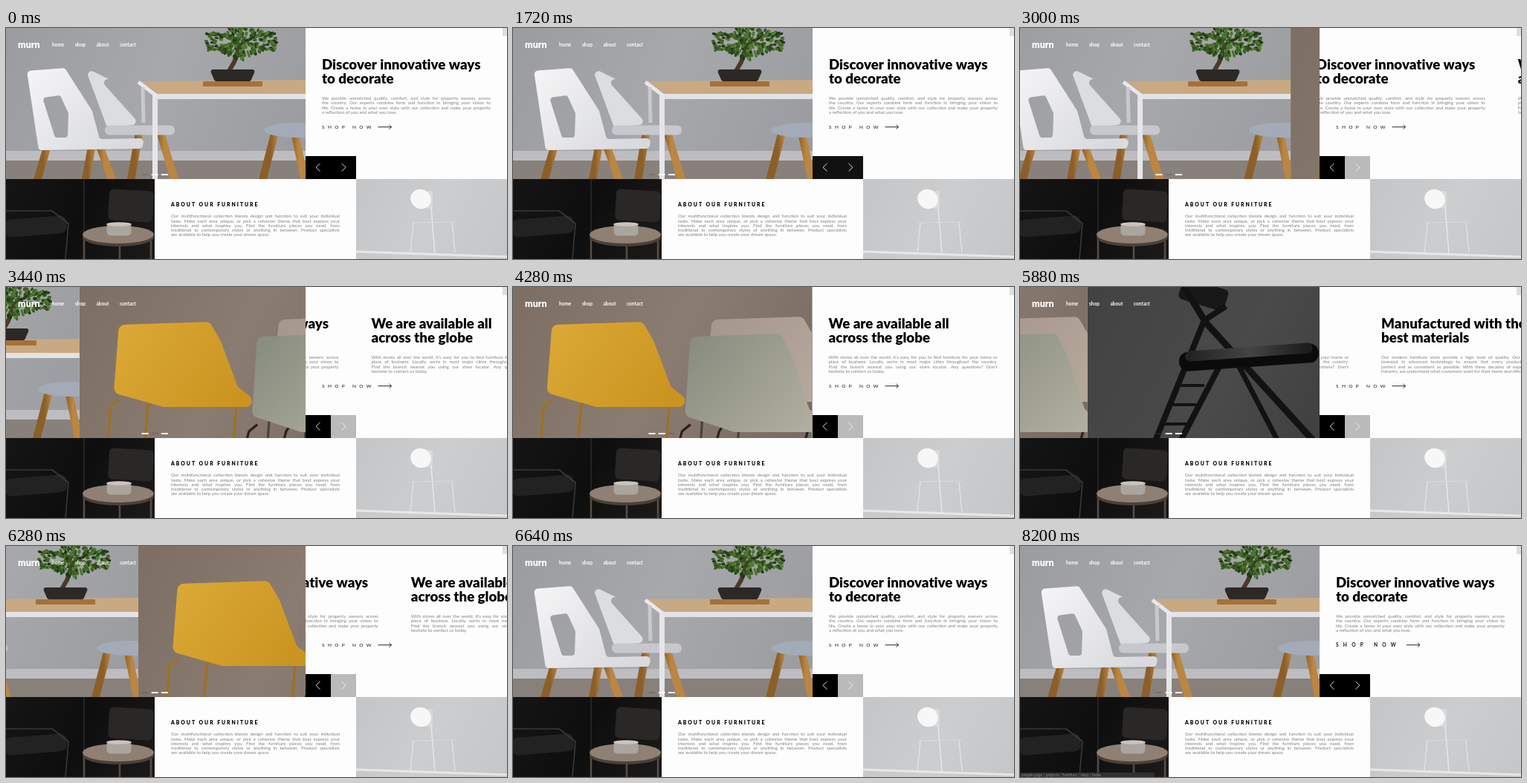
An HTML page with a canvas for the animation above (9920 ms loop, 674x312 px).

```html
<!DOCTYPE html>
<html lang="en">
<head>
<meta charset="utf-8">
<title>Furniture showroom</title>
<style>
html, body { margin: 0; width: 100%; height: 100%; overflow: hidden; background: #fff; }
canvas { display: block; width: 674px; height: 312px; }
</style>
</head>
<body>
<canvas id="stage"></canvas>
<script>
const W = 674, H = 312, LOOP = 9920, STEP = 40;
const PHOTO_W = 403, TEXT_W = W - PHOTO_W, TOP_H = 204, MARGIN = 425;
const SLIDE_MS = 1000, SLIDE_STARTS = [2783, 4252, 5646];
const FONT = 'Lato, "Open Sans", sans-serif';
const canvas = document.getElementById('stage');
const g = canvas.getContext('2d');
const dpr = window.devicePixelRatio || 1;
canvas.width = W * dpr;
canvas.height = H * dpr;

const copy = [
  { title: ['Discover innovative ways', 'to decorate'],
    body: ['We provide unmatched quality, comfort, and style for property owners across',
      'the country. Our experts combine form and function in bringing your vision to',
      'life. Create a home in your own style with our collection and make your property',
      'a reflection of you and what you love.'] },
  { title: ['We are available all', 'across the globe'],
    body: ['With stores all over the world, it\'s easy for you to find furniture for your home or',
      'place of business. Locally, we\'re in most major cities throughout the country.',
      'Find the branch nearest you using our store locator. Any questions? Don\'t',
      'hesitate to contact us today.'] },
  { title: ['Manufactured with the', 'best materials'],
    body: ['Our modern furniture store provide a high level of quality. Our company has',
      'invested in advanced technology to ensure that every product is made as',
      'perfect and as consistent as possible. With three decades of experience in this',
      'industry, we understand what customers want for their home and office.'] }
];
const about = ['Our multifunctional collection blends design and function to suit your individual',
  'taste. Make each area unique, or pick a cohesive theme that best express your',
  'interests and what inspires you. Find the furniture pieces you need, from',
  'traditional to contemporary styles or anything in between. Product specialists',
  'are available to help you create your dream space.'];

const clamp = v => Math.max(0, Math.min(1, v));
const lerp = (a, b, k) => a + (b - a) * k;
const ramp = (t, a, b) => clamp((t - a) / (b - a));
const gray = v => `rgb(${v},${v},${v})`;

// Same curve as CSS ease-in-out, cubic-bezier(.42, 0, .58, 1).
function easeInOut(x) {
  let lo = 0, hi = 1;
  for (let i = 0; i < 20; i++) {
    const s = (lo + hi) / 2, r = 1 - s;
    if (1.26 * s * r * r + 1.74 * s * s * r + s * s * s < x) lo = s; else hi = s;
  }
  return lo * lo * (3 - 2 * lo);
}

function seeded(seed) {
  return () => (seed = (seed * 16807) % 2147483647) / 2147483647;
}

function rect(color, x, y, w, h) {
  g.fillStyle = color;
  g.fillRect(x, y, w, h);
}

// Rounded box around a centre, turned by an angle.
function box(color, cx, cy, w, h, r, turn = 0) {
  g.save();
  g.translate(cx, cy);
  g.rotate(turn);
  g.beginPath();
  g.roundRect(-w / 2, -h / 2, w, h, r);
  g.fillStyle = color;
  g.fill();
  g.restore();
}

function fade(x0, y0, x1, y1, ...colors) {
  const f = g.createLinearGradient(x0, y0, x1, y1);
  colors.forEach((c, i) => f.addColorStop(i / (colors.length - 1), c));
  return f;
}

// Closed polygon with optionally rounded corners.
function poly(color, pts, r = 0) {
  const n = pts.length;
  g.beginPath();
  g.moveTo((pts[n - 2] + pts[0]) / 2, (pts[n - 1] + pts[1]) / 2);
  for (let i = 0; i < n; i += 2)
    g.arcTo(pts[i], pts[i + 1], pts[(i + 2) % n], pts[(i + 3) % n], r);
  g.closePath();
  g.fillStyle = color;
  g.fill();
}

function line(color, width, ...pts) {
  g.beginPath();
  for (let i = 0; i < pts.length; i += 2) g.lineTo(pts[i], pts[i + 1]);
  g.strokeStyle = color;
  g.lineWidth = width;
  g.lineJoin = 'round';
  g.stroke();
}

function oval(color, x, y, rx, ry, turn = 0) {
  g.beginPath();
  g.ellipse(x, y, rx, ry, turn, 0, 7);
  g.fillStyle = color;
  g.fill();
}

// Tiny default spacing keeps letters apart instead of joined as ligatures.
function text(str, x, y, size, weight, color, spacing = 0.01) {
  g.font = `${weight} ${size}px ${FONT}`;
  g.letterSpacing = spacing + 'px';
  g.fillStyle = color;
  g.fillText(str, x, y);
  return g.measureText(str).width;
}

// Justified paragraph; the last line stays ragged.
function paragraph(lines, x, y, width = 227) {
  g.font = `400 6.1px ${FONT}`;
  g.letterSpacing = '0px';
  g.fillStyle = '#808080';
  lines.forEach((str, row) => {
    const words = str.split(' '), widths = words.map(w => g.measureText(w).width);
    const free = width - widths.reduce((a, b) => a + b);
    const gap = row < lines.length - 1 ? free / (words.length - 1) : g.measureText(' ').width;
    let at = x;
    words.forEach((w, i) => {
      g.fillText(w, at, y + row * 6.25);
      at += widths[i] + gap;
    });
  });
}

function clipped(x, y, w, h, draw) {
  g.save();
  g.beginPath();
  g.rect(x, y, w, h);
  g.clip();
  draw();
  g.restore();
}

function woodLeg(x, y, lean) {
  line(fade(x - 5, 0, x + 5, 0, '#8c5f28', '#bb8641'), 10.5, x, y, x + lean, TOP_H + 2);
}

function bonsai(cx) {
  line('#4a3a2a', 6, cx - 16, 58, cx - 9, 46, cx, 20);
  const rnd = seeded(41);
  for (let i = 0; i < 420; i++) {
    const a = rnd() * 6.283, d = Math.sqrt(rnd()), lift = rnd();
    oval(`hsl(${lerp(88, 104, rnd())},45%,${lerp(13, 36, lift)}%)`,
      cx + Math.cos(a) * d * 49, 18 + Math.sin(a) * d * 21 + 4 * Math.sin(a * 5), 2.7, 1.7, a);
  }
  box('#a5713a', cx - 11, 75.5, 80, 7, 1);
  poly('#2b2826', [cx - 42, 56, cx + 20, 56, cx + 13, 72, cx - 35, 72], 3);
}

function diningPhoto() {
  const wall = fade(0, 0, PHOTO_W, 160, '#9b9ca0', '#a7a8ac', '#9b9ca0');
  rect(wall, 0, 0, PHOTO_W, TOP_H);
  rect('#bdbdc1', 0, 166, PHOTO_W, 13);
  rect('#88817b', 0, 179, PHOTO_W, 25);

  woodLeg(361, 144, -16);
  woodLeg(389, 144, 13);
  oval('#a3abb8', 392, 138, 45, 10);

  woodLeg(179, 142, -11);
  woodLeg(208, 142, 19);
  poly('#dcdde0', [106, 53, 116, 58, 180, 130, 136, 134], 5);
  box('#c6c8cd', 180, 138, 94, 13, 6);

  poly('#c9a982', [180, 72, PHOTO_W, 70, PHOTO_W, 89, 206, 89]);
  rect('#e3e3e6', 200, 89, 203, 7);
  line('#e8e8ea', 5, 178, 73, 203, 92);
  line('#c8c9cd', 5, 184, 80, 185, 128);
  rect('#e6e6e9', 197, 91, 7, 113);

  woodLeg(55, 162, -13);
  woodLeg(115, 162, -8);
  woodLeg(127, 162, 16);
  poly(fade(30, 55, 150, 165, '#f5f5f6', '#d9dade'),
    [28, 58, 79, 54, 116, 112, 126, 150, 186, 149, 183, 163, 44, 165], 5);
  poly(wall, [49, 94, 73, 91, 84, 115, 83, 148, 66, 148], 4);
  bonsai(316);
}

// Moulded chair on thin tubes; k scales its height.
function shellChair(x, y, k, body, tube) {
  for (const foot of [-13, 37, 156])
    line(tube, 3.3, x + foot * 0.9 + 12, y + 104 * k, x + foot + 2, y + 112 * k, x + foot - 2, 210);
  const [light, dark] = body;
  poly(fade(x, y, x + 150, y + 113 * k, light, dark),
    [0, 2, 122, -2, 137, 24, 160, 86, 181, 102, 176, 113, 60, 113, -7, 94]
      .map((v, i) => i % 2 ? y + v * k : x + v), 9);
}

function cafePhoto() {
  rect(fade(0, 0, PHOTO_W, TOP_H, '#7d6e64', '#8b7c72', '#786a61'), 0, 0, PHOTO_W, TOP_H);
  shellChair(268, 42, 1, ['#a5968b', '#b7aa9d'], '#4b423d');
  shellChair(53, 49, 1, ['#dba936', '#cb9420'], '#9c7220');
  shellChair(239, 65, 1.16, ['#878c7e', '#b0ae9e'], '#28231f');
}

function foldingPhoto() {
  rect(fade(0, 0, PHOTO_W, TOP_H, '#424242', '#4a4a4a', '#3a3a3a'), 0, 0, PHOTO_W, TOP_H);
  const black = '#121212';
  box('#181818', 156, 10, 64, 30, 6, 0.3);
  line(black, 9, 130, 0, 159, 48, 306, 210);
  line(black, 8, 186, 26, 157, 45, 91, 208);
  line(black, 8, 179, 104, 125, 208);
  line(black, 7, 202, 104, 256, 208);
  for (let y = 133; y < TOP_H; y += 26) {
    const x = 121 - (y - 133) * 0.4;
    line(black, 4, x, y, x + 36, y);
  }
  box('#0b0b0b', 217, 95, 188, 26, 12, -0.07);
  box(fade(-80, 0, 80, 0, '#222', '#454545', '#1c1c1c'), 217, 88, 172, 14, 7, -0.07);
}

const photos = [diningPhoto, cafePhoto, foldingPhoto];

function loungePhoto() {
  rect(fade(0, 204, 200, 312, '#151515', '#0e0e0e', '#1d1b19'), 0, 204, 200, 108);
  rect('#232323', 104, 204, 2, 80);
  box('#292827', 168, 240, 60, 42, 6, 0.06);
  box('#222', 40, 268, 84, 24, 9, -0.08);
  line('#3a3936', 1.6, 0, 247, 62, 247, 84, 264, 80, 312);
  for (const x of [105, 153, 195]) line('#574d45', 2.5, x, 282, x, 312);
  oval('#4c4138', 151, 283, 48, 12);
  oval('#8f8073', 151, 279, 48, 12);
  box('#aaa59e', 152, 272, 33, 17, 5);
  oval('#c9c4bd', 152, 265, 17, 2.8);
}

function studioPhoto() {
  rect(fade(471, 204, 674, 312, '#c3c5c7', '#cbcdcf', '#c4c6c8'), 471, 204, 203, 108);
  line('#e6e7e8', 3, 471, 302, 674, 309);
  box('#d9dadb', 570, 232, 8, 24, 3);
  oval('#f7f7f7', 558, 231, 14, 13, 0.5);
  line('#e9e9ea', 1.4, 572, 242, 577, 305);
  line('#dadbdd', 1, 546, 263, 604, 262);
  for (const side of [-1, 1])
    line('#e3e4e5', 1.2, 574 + side * 26, 263, 574 + side * 30, 304);
}

function position(t) {
  let at = 0, active = 0;
  SLIDE_STARTS.forEach((start, from) => {
    if (t < start) return;
    active = (from + 1) % copy.length;
    at = lerp(from, active, easeInOut(clamp((t - start) / SLIDE_MS)));
  });
  return { at, active };
}

function header(active) {
  text('murn', 16, 27, 12.5, 900, '#fff');
  let x = 62;
  for (const label of ['home', 'shop', 'about', 'contact'])
    x += text(label, x, 25.2, 6.5, 700, '#fff') + 14.6;
  for (let i = 0; i < copy.length; i++)
    rect(i === active ? 'rgba(75,58,55,.25)' : '#fff', 182.5 + i * 13.2, 197, 9, 2);
}

function slideText(slide, x) {
  slide.title.forEach((s, i) => text(s, x, 56 + i * 19.3, 18.7, 900, '#000'));
  paragraph(slide.body, x, 97);
}

function shopLink(k) {
  text('SHOP NOW', MARGIN, 136.3, 6.5, k > 0.4 ? 700 : 400, '#111', lerp(4.35, 6.3, k));
  const x = lerp(500.5, 520, k), y = 133.7;
  line('#111', 0.9, x, y, x + 18, y);
  line('#111', 0.9, x + 15, y - 2.8, x + 18, y, x + 15, y + 2.8);
}

function arrowButton(x, shade, dir) {
  rect(gray(shade), x, 173, 34, 31);
  const tip = x + 17 + dir * 3, back = tip - dir * 5.5;
  line('#f4f4f4', 0.9, back, 183, tip, 188.3, back, 193.6);
}

function buttons(t) {
  const base = t >= 1720 && t < 1760 ? 17 : 0;
  const hover = ramp(t, 1920, 2320) * (1 - ramp(t, 6840, 7120));
  arrowButton(403, base, -1);
  arrowButton(437, Math.round(lerp(base, 186, hover)), 1);
}

function statusBar(alpha) {
  g.globalAlpha = alpha;
  rect('#303030', 0, 306, 181, 6);
  text('sample-page / projects / furniture / shop / index', 2, 310.7, 5, 400, '#8d8d8d');
  g.globalAlpha = 1;
}

function draw(now) {
  const t = Math.floor((now % LOOP) / STEP) * STEP;
  const { at, active } = position(t);
  g.setTransform(dpr, 0, 0, dpr, 0, 0);
  rect('#fdfdfd', 0, 0, W, H);

  clipped(0, 0, PHOTO_W, TOP_H, () => {
    photos.forEach((photo, i) => {
      const x = (i - at) * PHOTO_W;
      if (Math.abs(x) >= PHOTO_W) return;
      g.save();
      g.translate(x, 0);
      clipped(0, 0, PHOTO_W, TOP_H, photo);
      g.restore();
    });
    header(active);
  });
  clipped(PHOTO_W, 0, TEXT_W, TOP_H, () =>
    copy.forEach((slide, i) => slideText(slide, MARGIN + (i - at) * TEXT_W)));

  shopLink(easeInOut(ramp(t, 7680, 8120)));
  buttons(t);
  clipped(0, 204, 200, 108, loungePhoto);
  clipped(471, 204, 203, 108, studioPhoto);
  text('ABOUT OUR FURNITURE', 222, 241.3, 6.8, 900, '#000', 1.98);
  paragraph(about, 222, 256.3);
  rect('#dedede', 668, 0, 6, 11);
  statusBar(ramp(t, 7960, 8200));
}

const begin = performance.now();
function tick() {
  draw(performance.now() - begin);
  requestAnimationFrame(tick);
}
tick();
</script>
</body>
</html>
```
